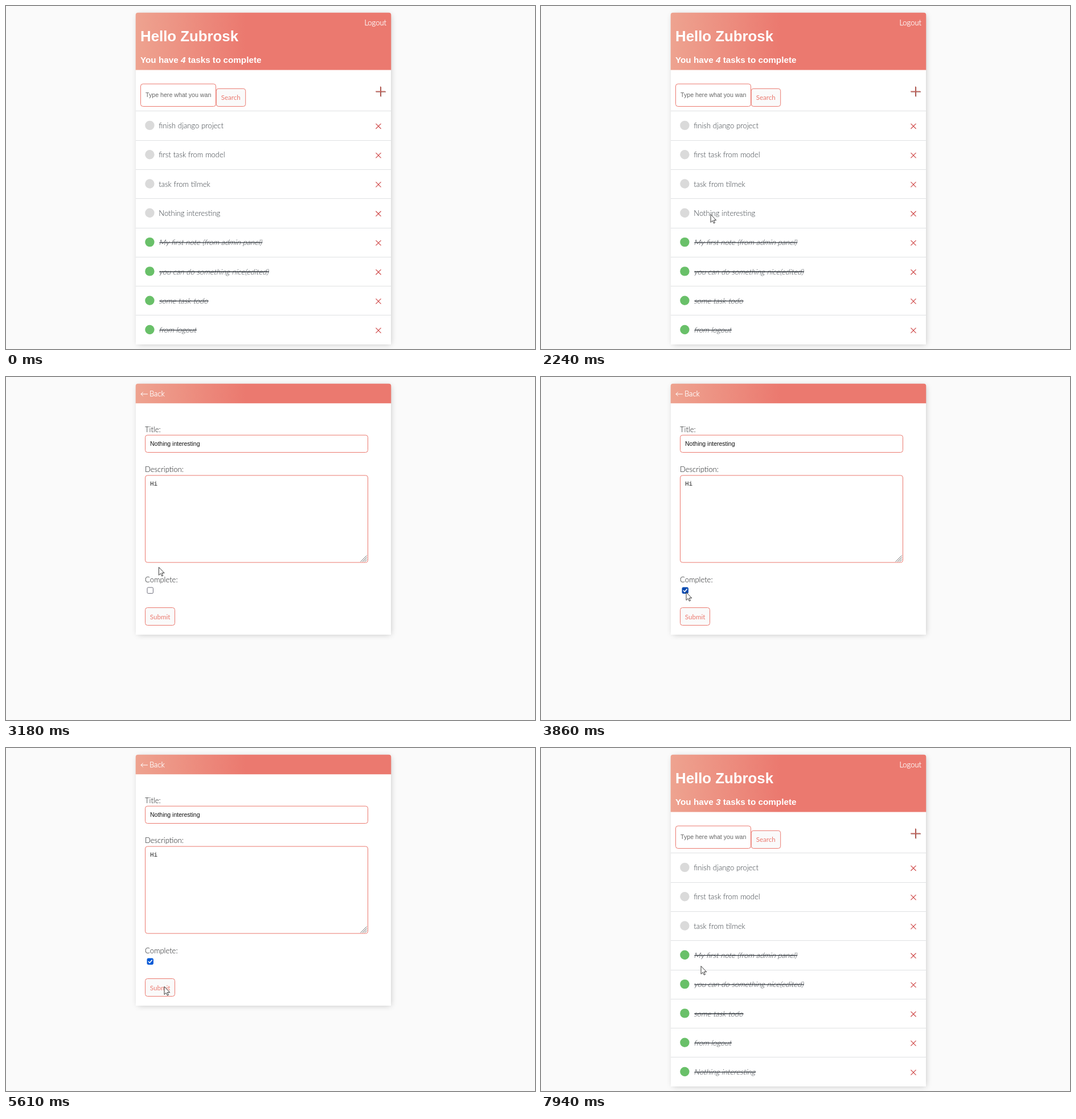
Write an HTML page that moves like this. It is 929 by 603 pixels and loops after 8 s.

```html
<!DOCTYPE html>
<html lang="en">
<head>
<meta charset="utf-8">
<title>To-do list</title>
<style>
html, body { margin: 0; width: 100%; height: 100%; overflow: hidden; background: #fafafa; }
#card {
  position: absolute; left: 228px; top: 12px; width: 448px; height: 583px;
  border-radius: 4px 4px 0 0; background: #fff;
  box-shadow: 1.6px 1.6px 10.5px -2px rgba(0, 0, 0, .23);
}
#card.form { height: 441px; }
svg { position: absolute; left: 0; top: 0; }
text { font: 300 13px Lato, sans-serif; word-spacing: .3px; fill: #353b41; white-space: pre; }
text.done { fill: #343a40; text-decoration: line-through; text-decoration-thickness: 1px; }
text.white { fill: #fff; stroke: #fff; stroke-width: .25; }
text.label { fill: #151719; }
text.head { font: bold 25.8px "Liberation Sans", sans-serif; word-spacing: 0; fill: #fff; }
text.sub { font-size: 15.25px; }
text.field { font: 10.5px "Liberation Sans", sans-serif; word-spacing: 0; fill: #111; }
text.hint { font-size: 10.65px; fill: #666; }
text.mono { font: 11px "Liberation Mono", monospace; fill: #222; text-rendering: geometricPrecision; }
text.button { font-weight: 400; font-size: 11.6px; fill: #eb796f; }
.bar { fill: url(#warm); }
.box { fill: #fff; stroke: #eb796f; }
.button-box { fill: #fafafa; stroke: #eb796f; }
.line { fill: none; stroke-linecap: round; }
#cursor path { fill: #fff; stroke: #222; stroke-width: .9; stroke-linejoin: round; }
</style>
</head>
<body>
<div id="card"></div>
<svg width="929" height="603" viewBox="0 0 929 603">
  <linearGradient id="warm">
    <stop stop-color="#eea390"/>
    <stop offset=".43" stop-color="#eb796f"/>
  </linearGradient>
  <g id="list">
    <path class="bar" d="M227.7 112.4V16a4 4.2 0 0 1 4-4.2H672.3a4 4.2 0 0 1 4 4.2V112.4z"/>
    <text class="head" x="236" y="62">Hello Zubrosk</text>
    <text class="head sub" x="236" y="100">You have <tspan id="count" font-style="italic">4</tspan> tasks to complete</text>
    <text class="white" x="668" y="34" text-anchor="end">Logout</text>
    <rect class="box" x="236.5" y="137" width="132" height="39.5" rx="4"/>
    <text class="field hint" x="245" y="160.3">Type here what you wan</text>
    <rect class="button-box" x="369.2" y="145.3" width="51.5" height="31.2" rx="4"/>
    <text class="button" x="377.7" y="165">Search</text>
    <path class="line" stroke="#81413b" stroke-width="1.4" d="M650.2 150.9H666.4M658.3 142.6V158.8"/>
    <path class="line" stroke="#c8675f" stroke-width="1.3" d="M649.6 150.1H665.8M657.6 141.9V158.1"/>
    <g id="rows"></g>
  </g>
  <g id="form">
    <path class="bar" d="M227.7 46.2V16a4 4.2 0 0 1 4-4.2H672.3a4 4.2 0 0 1 4 4.2V46.2z"/>
    <path class="line" stroke="#fff" d="M248.6 30H237M240.4 26.8L237 30L240.4 33.2"/>
    <text class="white" x="252" y="33.7">Back</text>
    <text class="label" x="244" y="97">Title:</text>
    <rect class="box" x="244.5" y="102.2" width="391" height="30.3" rx="4"/>
    <text class="field" x="253" y="121.4">Nothing interesting</text>
    <text class="label" x="244" y="167">Description:</text>
    <rect class="box" x="244.5" y="173" width="391" height="153" rx="4"/>
    <text class="mono" x="253" y="190.6">Hi</text>
    <path class="line" stroke="#666" d="M623 324.5L633.5 314M626.5 324.5L633.5 317.5M630 324.5L633.5 321"/>
    <text class="label" x="244" y="361.3">Complete:</text>
    <rect id="check" x="248" y="370" width="10.4" height="10.4" rx="1.6"/>
    <path id="tick" class="line" stroke="#fff" stroke-width="1.6" d="M250.3 375.5L252.4 377.6L256.2 372.9"/>
    <rect class="button-box" x="244.5" y="405.5" width="52" height="31" rx="4"/>
    <text class="button" x="252.8" y="425.6">Submit</text>
  </g>
  <g id="cursor">
    <path id="arrow" d="M0 .4V14.4L3.2 11.4 5.4 16 7.4 15.1 5.3 10.6H9.7z"/>
    <path id="hand" d="M-1.2 1.2a1.2 1.2 0 0 1 2.5 0V7q0-1.2 1.3-1.2t1.3 1.4q.1-1 1.2-1t1.2 1.3q.1-.8 1-.8t1 1.3V12q0 2-1.2 3.5V18H0V16.3L-4 11.6q-1-1.4 0-2t2.8 1.6z"/>
    <circle id="ring" r="9.8" fill="#ff0" fill-opacity=".47"/>
  </g>
</svg>
<script>
const LOOP = 8000, ROW = 51.3;
const $ = id => document.getElementById(id);
const show = (id, on) => { $(id).style.display = on ? '' : 'none'; };
const within = (t, from, to) => t >= from && t < to;

const open = ['finish django project', 'first task from model', 'task from tilmek'];
const done = ['My first note (from admin panel)', 'you can do something nice(edited)', 'some task todo', 'from logout'];
const moved = 'Nothing interesting';

const moves = [
  [12, [800, 687, 489], [1080, 430, 425], [1350, 299.5, 375], [1560, 298, 366]],
  [10, [2770, 296, 356], [2980, 285, 304], [3050, 281, 292], [3250, 262, 355], [3390, 255, 378]],
  [9, [4320, 257, 381], [4600, 278, 410], [4740, 288, 422], [4870, 278, 419]],
  [7, [6660, 279, 413], [6900, 281, 390], [7140, 280.5, 375]],
  [2, [7870, 281, 379], [7940, 281, 383]],
];

function row(name, complete, i) {
  const y = 185.3 + ROW * i;
  const skew = complete ? ' skewX(-14)' : '';
  return `<path stroke="#dfe1e3" d="M228 ${Math.round(y) - .5}H676"/>
    <circle cx="252.4" cy="${y + 24.6}" r="8.2" fill="${complete ? '#69c069' : '#dadada'}"/>
    <text class="${complete ? 'done' : ''}" transform="translate(268.3 ${y + 29.7})${skew}">${name}</text>
    <path class="line" stroke="#cf4949" stroke-width="1.2" transform="translate(654 ${y + 26})" d="M-4.2 -4.2L4.2 4.2M4.2 -4.2L-4.2 4.2"/>`;
}

function fillList(finished) {
  const active = finished ? open : [...open, moved];
  const complete = finished ? [...done, moved] : done;
  $('count').textContent = active.length;
  $('rows').innerHTML = [...active, ...complete].map((name, i) => row(name, i >= active.length, i)).join('');
}

function cursorAt(t) {
  const move = moves.filter(m => m[1][0] <= t).pop();
  if (!move) return null;
  const [steps, ...points] = move;
  const start = points[0], end = points[points.length - 1];
  const step = (end[0] - start[0]) / (steps - 1);
  const time = start[0] + Math.floor((t - start[0]) / step + .1) * step;
  const next = points.findIndex(p => p[0] > time);
  if (next < 1) return end.slice(1);
  const a = points[next - 1], b = points[next];
  const k = (time - a[0]) / (b[0] - a[0]);
  return [a[1] + (b[1] - a[1]) * k, a[2] + (b[2] - a[2]) * k];
}

let shownState;
function draw(t) {
  const onForm = within(t, 2310, 5680), finished = t >= 5680;
  if (finished !== shownState) fillList(shownState = finished);
  $('card').className = onForm ? 'form' : '';
  show('list', !onForm);
  show('form', onForm);

  const checked = t >= 3790, hovered = t < 4390;
  const blue = hovered ? '#0b4bb0' : '#075ad6';
  $('check').setAttribute('fill', checked ? blue : '#fff');
  $('check').setAttribute('stroke', checked ? blue : '#6d6d7a');
  show('tick', checked);

  const spot = cursorAt(t);
  show('cursor', spot);
  if (!spot) return;
  $('cursor').setAttribute('transform', `translate(${spot})`);
  const hand = within(t, 1490, 2240) || within(t, 5680, 6730);
  show('hand', hand);
  show('arrow', !hand);
  show('ring', within(t, 2170, 2240) || within(t, 3590, 3720) || within(t, 5010, 5150));
}

const began = performance.now();
function tick() {
  draw((performance.now() - began) % LOOP);
  requestAnimationFrame(tick);
}
tick();
</script>
</body>
</html>
```
